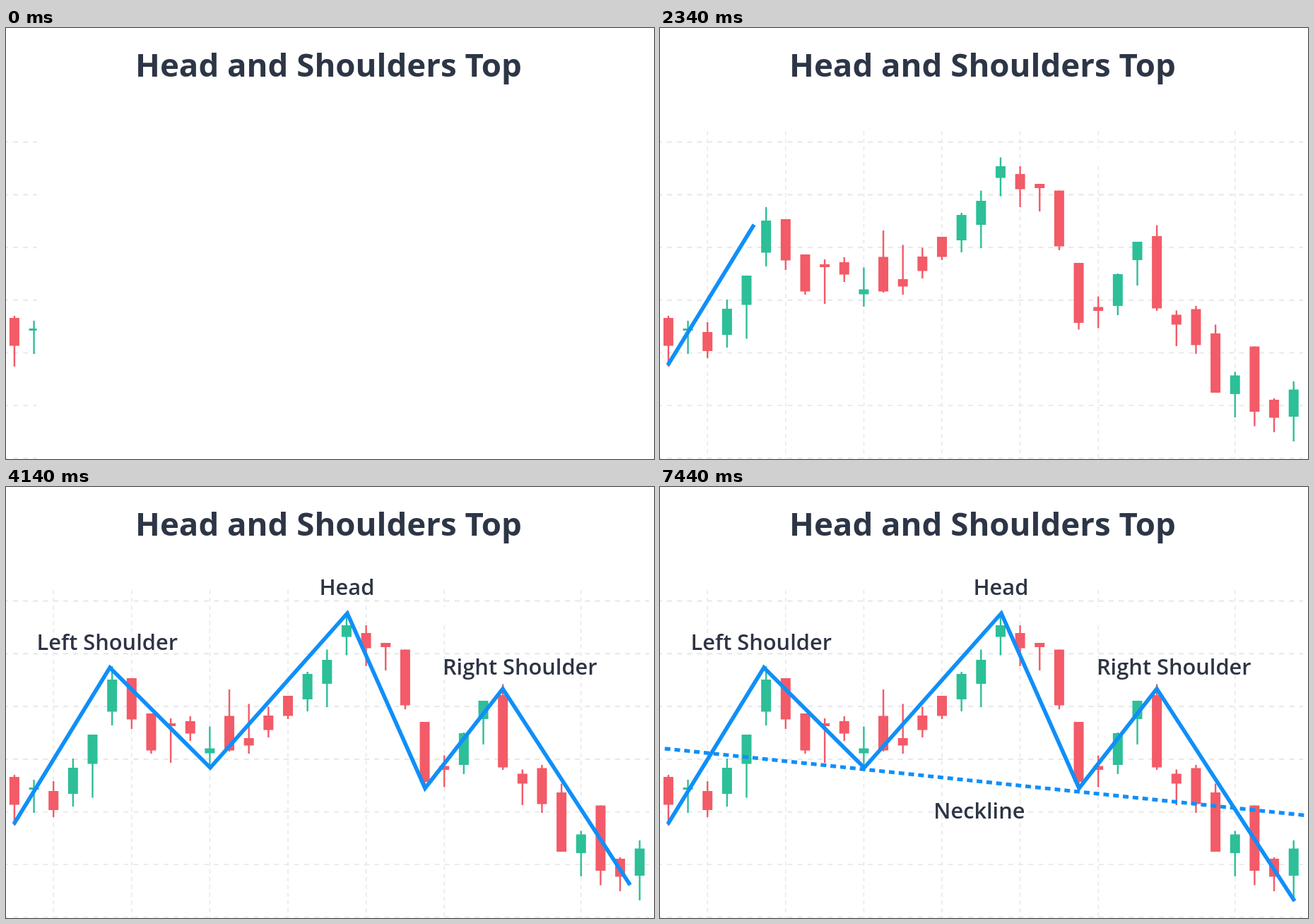
Animation of 917 by 611 pixels, one loop 7500 ms. Source, as an HTML page:

```html
<!DOCTYPE html>
<html lang="en">
<head>
<meta charset="utf-8">
<title>Head and Shoulders Top</title>
<style>
  html, body { margin: 0; width: 100%; height: 100%; overflow: hidden; background: #fff; }
  svg { display: block; width: 917px; height: 611px; }
  text { font-family: "Open Sans", sans-serif; font-weight: 600; font-size: 30.8px; fill: #2d3444; text-anchor: middle; }
  #title { font-weight: 700; font-size: 45.6px; fill: #2d3646; }
</style>
</head>
<body>
<svg viewBox="0 0 917 611">
  <defs>
    <clipPath id="chartClip"><rect id="chartWipe" height="611"/></clipPath>
    <clipPath id="neckClip"><rect id="neckWipe" height="611"/></clipPath>
  </defs>
  <rect width="917" height="611" fill="#fff"/>
  <g clip-path="url(#chartClip)">
    <g id="grid" fill="none" stroke="#e9e9eb"></g>
    <g id="candles"></g>
  </g>
  <path id="trend" fill="none" stroke="#108ff8" stroke-width="5.6" stroke-miterlimit="8"/>
  <path d="M6.7 370.8L912 465.4" clip-path="url(#neckClip)" fill="none" stroke="#108ff8" stroke-width="5.2" stroke-dasharray="8 5.87"/>
  <text id="title" x="456.4" y="69">Head and Shoulders Top</text>
  <g id="labels"></g>
</svg>
<script>
const LOOP = 7500, RED = '#f25b67', GREEN = '#2dbf98';
const $ = id => document.getElementById(id);

function add(parent, tag, attrs, text) {
  const el = document.createElementNS('http://www.w3.org/2000/svg', tag);
  for (const k in attrs) el.setAttribute(k, attrs[k]);
  if (text) el.textContent = text;
  return $(parent).appendChild(el);
}

// high, body top, body bottom, low
const candles = [
  [408, 411, 450.5, 480], [415, 426, 429, 462], [417, 431, 458, 468],
  [385, 398, 435, 453], [351, 351, 392.5, 440.5], [254, 273, 318.5, 338],
  [271, 271, 329.5, 343], [321, 321, 373.5, 378], [328, 335, 339, 391],
  [325, 332, 349.5, 360], [339.5, 370.5, 377.5, 395], [287, 324.5, 373.5, 375],
  [307.5, 356, 366.5, 378], [311.5, 324, 344.5, 355], [296, 296, 324.5, 329],
  [262, 265, 301, 318], [230.5, 245, 279, 312], [183.5, 196, 212.5, 238.5],
  [196, 207, 228.5, 254], [221, 221, 227, 260], [230.5, 230.5, 309.5, 315],
  [333, 333, 418, 427.5], [380.5, 395.5, 401, 425.5], [348, 349, 394, 407],
  [303, 303, 329, 365], [279.5, 295, 397.5, 401], [400.5, 406.5, 420.5, 451],
  [394, 398.5, 449.5, 462], [420.5, 433, 517, 517], [487.5, 492.5, 519, 552],
  [451.5, 451.5, 544, 564.5], [525, 527, 552.5, 573], [501, 512.5, 551, 586]
];
const rising = new Set([1, 3, 4, 5, 10, 15, 16, 17, 23, 24, 29, 32]);
const candleX = i => 11.9 + 27.65 * i;

for (let i = 0; i < 7; i++) {
  add('grid', 'path', {
    d: `M-4.2 ${161.7 + 74.7 * i}H910`, 'stroke-width': i < 4 ? 2.2 : 1.8, 'stroke-dasharray': '7 7.2'
  });
}
for (const i of [2, 6, 10, 14, 18, 22, 29]) {
  const x = candleX(i);
  add('grid', 'path', {
    d: i === 22 ? `M${x} 146V170M${x} 196V611` : `M${x} 146V611`,
    'stroke-width': 1.6, 'stroke-dasharray': '6 5'
  });
}
candles.forEach(([high, top, bottom, low], i) => {
  const x = candleX(i), fill = rising.has(i) ? GREEN : RED;
  add('candles', 'rect', { x: x - 1.2, y: high, width: 2.4, height: low - high, fill });
  add('candles', 'rect', { x: x - 7, y: top, width: 14, height: bottom - top, fill });
});

const points = [[11, 478], [147, 256], [289, 398], [483, 179], [593, 427], [703, 286], [898, 587]];

// time, drawn length
const pace = [[2030, 0], [2340, 233], [2760, 546], [3480, 1067], [4180, 1563]];

const labels = [
  ['Left Shoulder', 143.3, 231, 2380],
  ['Head', 482.4, 153, 3050],
  ['Right Shoulder', 727.3, 266, 3680],
  ['Neckline', 451.9, 469.5, 5810]
].map(([text, x, y, start]) => ({ start, el: add('labels', 'text', { x, y }, text) }));

const clamp = v => Math.max(0, Math.min(1, v));

function drawnLength(t) {
  let len = 0;
  for (let i = 1; i < pace.length; i++) {
    const [t0, l0] = pace[i - 1], [t1, l1] = pace[i];
    len += (l1 - l0) * clamp((t - t0) / (t1 - t0));
  }
  return len;
}

function trendPath(len) {
  if (len <= 0) return '';
  let d = 'M' + points[0];
  for (let i = 1; i < points.length && len > 0; i++) {
    const [x0, y0] = points[i - 1], [x1, y1] = points[i];
    const seg = Math.hypot(x1 - x0, y1 - y0), k = Math.min(1, len / seg);
    d += `L${x0 + (x1 - x0) * k},${y0 + (y1 - y0) * k}`;
    len -= seg;
  }
  return d;
}

function render(t) {
  $('chartWipe').setAttribute('width', Math.min(917, 43 + 0.4835 * t));
  $('trend').setAttribute('d', trendPath(drawnLength(t)));
  $('neckWipe').setAttribute('width', t < 5020 ? 0 : Math.min(917, 7 + 0.62 * (t - 5018)));
  for (const { el, start } of labels) el.setAttribute('opacity', clamp((t - start) / 240));
}

const begin = performance.now();
function tick() {
  render((performance.now() - begin) % LOOP);
  requestAnimationFrame(tick);
}
render(0);
requestAnimationFrame(tick);
</script>
</body>
</html>
```
